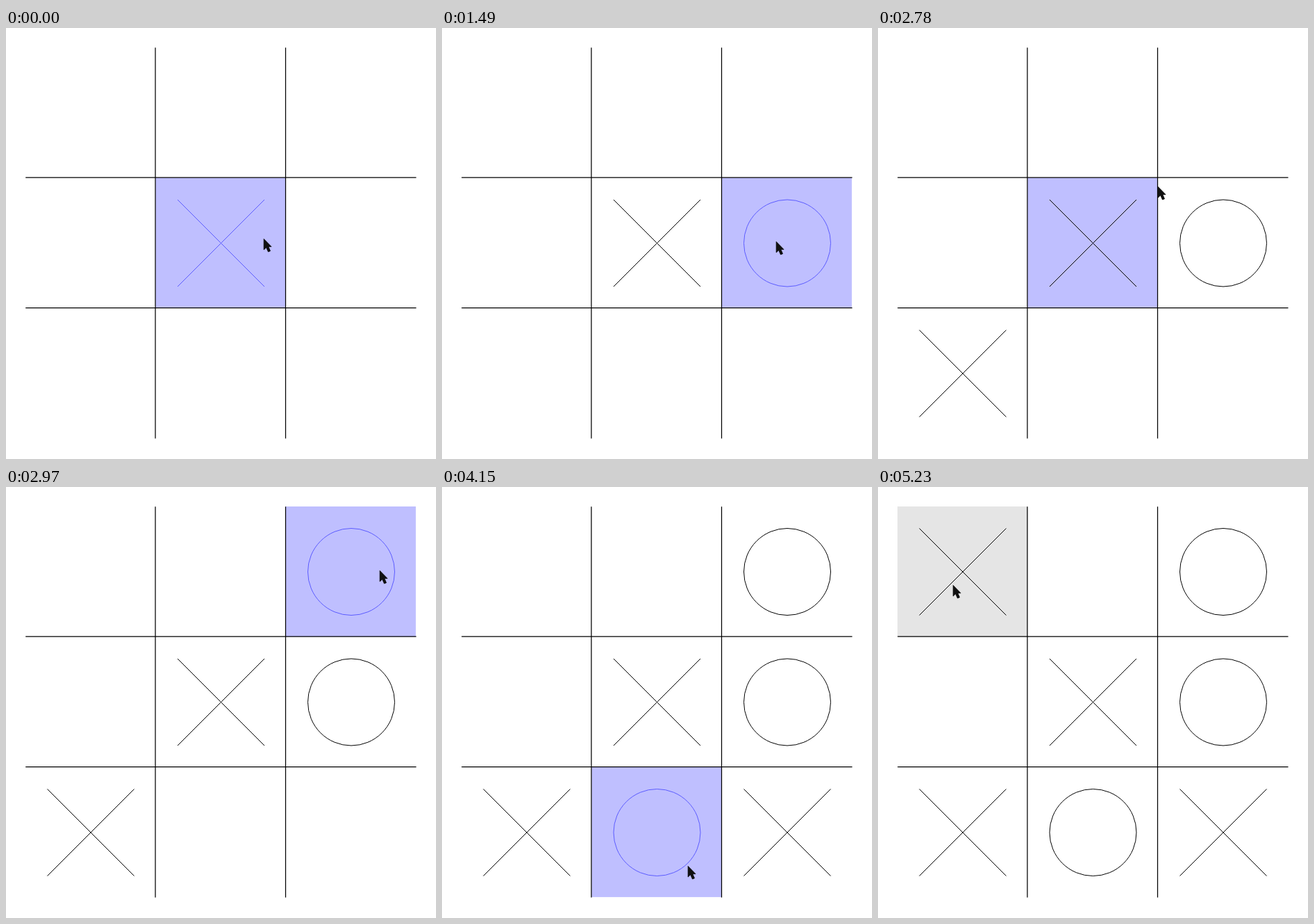
Recreate the animation shown at these times as an HTML page. Size 619 by 620 pixels, loop 6960 ms.

```html
<!DOCTYPE html>
<html lang="en">
<head>
<meta charset="utf-8">
<title>Noughts and crosses</title>
<style>
  html, body { margin: 0; width: 100%; height: 100%; overflow: hidden; background: #fff; }
  svg { display: block; width: 100%; height: 100%; }
  .grid { stroke: #000; stroke-width: 1.25; fill: none; }
  .mark { stroke: #000; fill: none; }
  .ghost { stroke: #5c5cff; }
</style>
</head>
<body>
<svg viewBox="0 0 619 620">
  <rect id="hover" width="187.3" height="187.3"/>
  <path class="grid" d="M215 28.2V590.5M402.5 28.2V590.5M28.2 215H590.5M28.2 402.5H590.5"/>
  <g id="marks"></g>
  <path id="cursor" fill="#111" stroke="#000" stroke-width=".8"
        d="M.2.4V16L3.7 12.7L6.5 19L9.5 17.7L6.8 11.6H11Z"/>
</svg>
<script>
const LOOP = 6960, STEP = 30, LEFT = 28, SIZE = 187.5, R = 62.5;

// Each turn: the pointer glides to a spot, then clicks there.
const turns = [
  { from: 0, to: 0, x: 371, y: 303, click: 1080 },
  { from: 1270, to: 1480, x: 481, y: 307, click: 1790 },
  { from: 1900, to: 2170, x: 95, y: 475, click: 2440 },
  { from: 2530, to: 2978, x: 545, y: 114, click: 3210 },
  { from: 3250, to: 3544, x: 412, y: 519, click: 3820 },
  { from: 4000, to: 4270, x: 330, y: 556, click: 4590 },
  { from: 4750, to: 5020, x: 108, y: 141, click: 5230 }
];
const WIN = turns[turns.length - 1].click;

const byId = id => document.getElementById(id);
const hover = byId("hover"), cursor = byId("cursor");

const marks = Array.from({ length: 9 }, () => {
  const path = document.createElementNS("http://www.w3.org/2000/svg", "path");
  return byId("marks").appendChild(path);
});

const easeOut = k => 1 - (1 - k) ** 1.5;
const index = v => Math.max(0, Math.min(2, Math.floor((v - LEFT) / SIZE)));
const cellAt = ({ x, y }) => index(y) * 3 + index(x);

function pointer(time) {
  const t = Math.max(0, Math.floor((time - 10) / STEP) * STEP + 10);
  const i = turns.filter(turn => turn.from <= t).length - 1;
  const goal = turns[i], last = turns[Math.max(0, i - 1)];
  const k = t < goal.to ? easeOut((t - goal.from) / (goal.to - goal.from)) : 1;
  const mix = (a, b) => Math.round(a + (b - a) * k);
  return { x: mix(last.x, goal.x), y: mix(last.y, goal.y) };
}

function shape(cell, turn) {
  const x = 122 + cell % 3 * SIZE, y = 122 + Math.floor(cell / 3) * SIZE;
  return turn % 2
    ? `M${x - R} ${y}a${R} ${R} 0 1 1 ${2 * R} 0a${R} ${R} 0 1 1 ${-2 * R} 0Z`
    : `M${x - R} ${y - R}l${2 * R} ${2 * R}M${x + R} ${y - R}l${-2 * R} ${2 * R}`;
}

function draw(t) {
  const { x, y } = pointer(t);
  cursor.setAttribute("transform", `translate(${x} ${y})`);

  // The highlight trails the pointer by one step.
  const over = cellAt(pointer(t - STEP));
  hover.setAttribute("x", LEFT + over % 3 * 187.3);
  hover.setAttribute("y", LEFT + Math.floor(over / 3) * 187.3);
  hover.setAttribute("fill", t < WIN ? "#bfbfff" : "#e5e5e5");

  const played = turns.filter(turn => turn.click <= t).map(cellAt);
  marks.forEach((path, cell) => {
    const turn = played.indexOf(cell);
    const ghost = turn < 0 && cell === over;
    path.setAttribute("class", ghost ? "mark ghost" : "mark");
    path.setAttribute("d", ghost ? shape(cell, played.length) : turn < 0 ? "" : shape(cell, turn));
  });
}

const start = performance.now();
function tick() {
  draw((performance.now() - start) % LOOP);
  requestAnimationFrame(tick);
}
tick();
</script>
</body>
</html>
```
